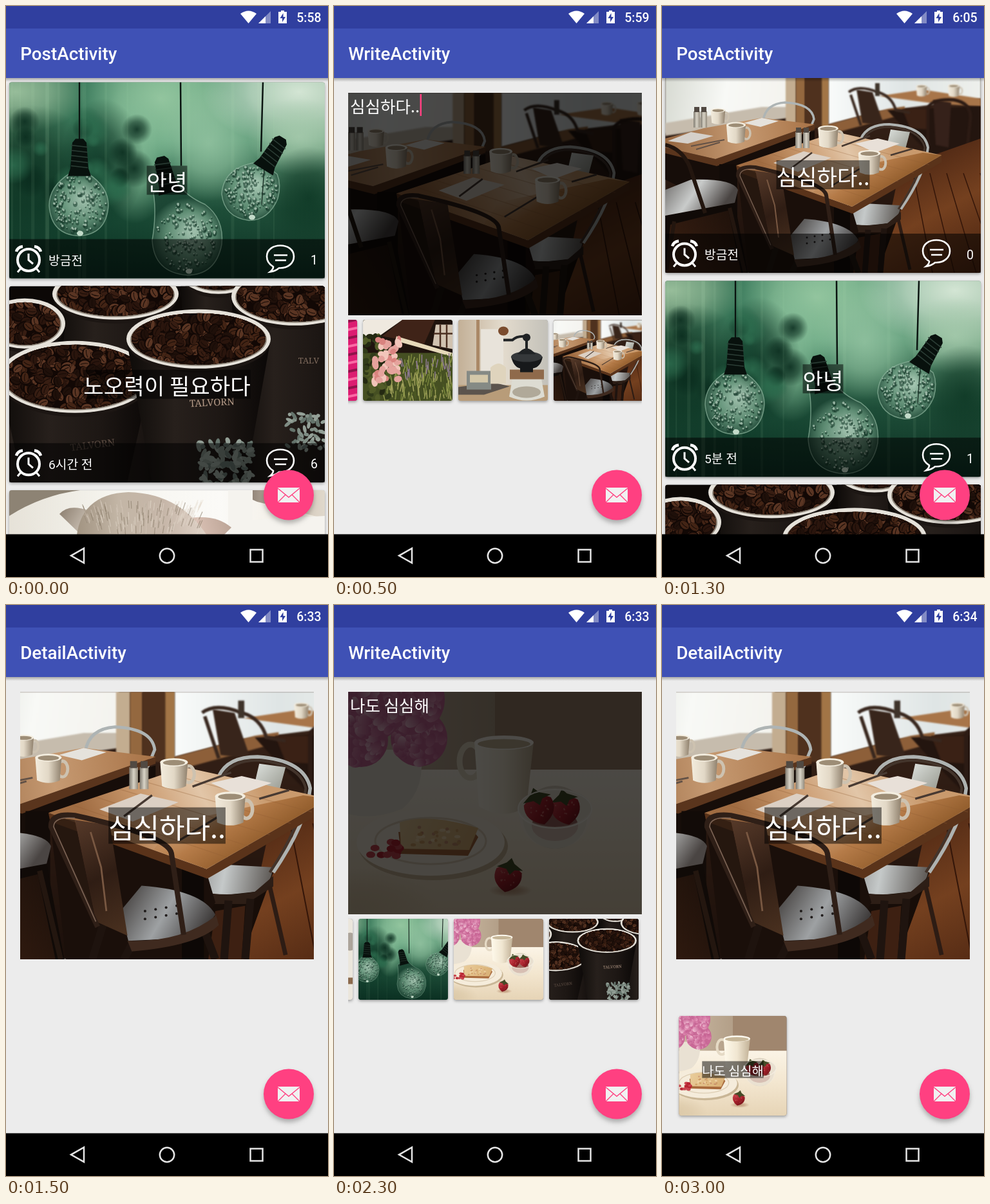
Write an HTML page with a canvas that moves like this. It is 500 by 888 pixels and loops after 3.5 s.

```html
<!DOCTYPE html>
<html lang="ko">
<head>
<meta charset="utf-8">
<style>
html, body { margin: 0; width: 100%; height: 100%; overflow: hidden; background: #ececec; }
canvas { display: block; width: 500px; height: 888px; }
</style>
</head>
<body>
<canvas id="stage" width="500" height="888"></canvas>
<script>
const ctx = document.getElementById('stage').getContext('2d');
const LATIN = 'Roboto, "Noto Sans CJK KR", "Noto Sans CJK", sans-serif';
const HANGUL = '"Noto Sans CJK KR", "Noto Sans CJK", sans-serif';

let seed = 1;
const rand = (lo = 0, hi = 1) => {
  seed = (seed * 16807) % 2147483647;
  return lo + (hi - lo) * seed / 2147483647;
};
const pick = list => list[Math.floor(rand(0, list.length))];

function rect(color, x, y, w, h) {
  ctx.fillStyle = color;
  ctx.fillRect(x, y, w, h);
}
function fill(color, d) {
  ctx.fillStyle = color;
  ctx.fill(new Path2D(d));
}
function stroke(color, width, d) {
  ctx.strokeStyle = color;
  ctx.lineWidth = width;
  ctx.stroke(new Path2D(d));
}
function ovalPath(x, y, rx, ry = rx, turn = 0) {
  ctx.beginPath();
  ctx.ellipse(x, y, rx, ry, turn, 0, 7);
}
function oval(color, ...shape) {
  ovalPath(...shape);
  ctx.fillStyle = color;
  ctx.fill();
}
function ring(color, width, ...shape) {
  ovalPath(...shape);
  ctx.strokeStyle = color;
  ctx.lineWidth = width;
  ctx.stroke();
}
function linear(x0, y0, x1, y1, ...colors) {
  const g = ctx.createLinearGradient(x0, y0, x1, y1);
  colors.forEach((c, i) => g.addColorStop(i / (colors.length - 1), c));
  return g;
}
function glow(color, x, y, rx, ry = rx) {
  ctx.save();
  ctx.translate(x, y);
  ctx.scale(1, ry / rx);
  const g = ctx.createRadialGradient(0, 0, 0, 0, 0, rx);
  g.addColorStop(0, color + 'e0');
  g.addColorStop(0.5, color + '90');
  g.addColorStop(1, color + '00');
  rect(g, -rx, -rx, 2 * rx, 2 * rx);
  ctx.restore();
}
function blurred(radius, draw) {
  ctx.filter = `blur(${radius}px)`;
  draw();
  ctx.filter = 'none';
}
function text(str, x, y, size, { font = LATIN, weight = 400, align = 'left', color = '#fff' } = {}) {
  ctx.font = `${weight} ${size}px ${font}`;
  ctx.textAlign = align;
  ctx.fillStyle = color;
  ctx.fillText(str, x, y);
}
function at(x, y, draw, turn = 0, scale = 1) {
  ctx.save();
  ctx.translate(x, y);
  ctx.rotate(turn);
  ctx.scale(scale, scale);
  draw();
  ctx.restore();
}

// ---- pictures ----

function mug(x, y, scale) {
  at(x, y, () => {
    ring('#cdc2b0', 3.5, 16, 0, 6, 9);
    fill(linear(-15, 0, 15, 0, '#f3ecdd', '#e2d8c6', '#8f806c'), 'M-15 -13L-13 13Q0 19 13 13L15 -13Z');
    oval('#f4eee0', 0, -13, 15, 4.5);
    oval('#9d8d76', 0, -12.5, 12, 3);
  }, 0, scale);
}
function shaker(x, y) {
  rect(linear(x, 0, x + 10, 0, '#7f7a70', '#d8d3c6', '#928a7c'), x, y, 10, 25);
  rect('#514942', x + 1, y - 7, 8, 8);
}
function cafeRoom() {
  rect(linear(0, 0, 0, 305, '#3a251a', '#2a1911', '#1c100b'), 0, 0, 490, 305);
  fill(linear(0, 0, 190, 30, '#d7dad2', '#f8f9f6', '#f4f3ee'), 'M0 0H190V62L0 88Z');
  fill('#c6bcad', 'M0 72L150 47H190V64L0 92Z');
  rect('#c3ad90', 187, 0, 16, 72);
  rect('#94683f', 203, 0, 14, 76);
  rect('#4f311e', 217, 0, 26, 80);
  rect('#a27546', 243, 0, 11, 78);
  fill(linear(254, 0, 490, 0, '#f9fbfa', '#dfe5e5', '#eef0ec'), 'M254 0H490V34L330 54L254 74Z');
  fill('#8d5f39', 'M254 74L345 50L372 46V58L254 90Z');
  fill('#a87549', 'M332 30L400 20L490 34V46L420 42Z');
  fill('#23150f', 'M345 52L490 46V150L420 130L365 74Z');
  fill('#3a2115', 'M368 50H408V82L380 80Z');
  // distant chairs
  fill('#38251b', 'M297 20L322 24L340 76L306 72Z');
  stroke('#38271e', 4, 'M285 24Q300 12 330 24Q352 30 358 52L380 56M288 28L304 76');
  fill('#35211a', 'M416 36L444 40L440 110L420 106Z');
  stroke('#2c1b14', 5, 'M408 108L408 50Q412 34 448 36Q474 40 474 64L466 140');
  mug(398, 22, 0.55);
  mug(448, 22, 0.6);
  rect('#3e332a', 326, 10, 7, 20);
}
function drawCafe() {
  blurred(1, cafeRoom);
  fill(linear(370, 120, 470, 305, '#4a2513', '#74401f', '#4c2511'), 'M365 140L490 96V305H330Z');
  for (let i = 0; i < 5; i++) stroke('#341609', 1.5, `M${385 + i * 26} 150L${415 + i * 34} 305`);
  // left table
  stroke('#aeb4b4', 3.5, 'M152 68Q156 42 186 40Q228 42 231 66L222 88');
  fill('#160d09', 'M0 112L78 128L232 84V100L112 140L60 190L0 160Z');
  fill('#5a351d', 'M0 110L78 128L232 74V82L80 139L0 119Z');
  fill(linear(0, 100, 230, 75, '#94653f', '#c69a72', '#a87347'), 'M0 96L60 80L150 64L232 74L78 128L0 110Z');
  fill('#d5d0ca', 'M4 100L40 86L75 92L35 104Z');
  fill('#e5e2dc', 'M122 72L150 64L176 69L148 78Z');
  stroke('#625146', 2, 'M40 108L92 98M48 113L85 102');
  mug(82, 62, 0.75);
  shaker(44, 54);
  shaker(55, 54);
  mug(110, 88, 1);
  rect('#120b08', 84, 136, 28, 130);
  // left chair
  fill('#100a07', 'M0 216L108 196L128 305H0Z');
  fill(linear(0, 305, 130, 220, '#3b2012', '#1c100a'), 'M8 230L98 208L118 305H0Z');
  fill(linear(0, 160, 80, 215, '#6f6d6b', '#c9cbca', '#4a4543'), 'M0 176L40 160Q105 158 113 176L108 196L0 216Z');
  stroke('#23160f', 6, 'M0 106Q26 112 38 140L62 212M14 225L2 300M100 204L124 305');
  // right chair
  fill('#170d08', 'M262 218L366 206L350 250L330 305H255Z');
  fill('#3d2012', 'M300 250L334 244L330 305H292Z');
  fill(linear(255, 200, 365, 220, '#6d6a68', '#c5c9c9', '#595450'), 'M252 212L290 196L364 200Q368 216 345 228L290 234Q256 230 252 212Z');
  fill('#2d1e16', 'M252 215Q290 238 345 228L366 210V222L335 242L275 242Z');
  stroke('#1f140f', 9, 'M315 238L310 305M340 236L334 305');
  stroke('#2d1c14', 5, 'M362 222L380 300');
  stroke('#aeb2b0', 4, 'M304 96Q314 74 348 74Q402 78 408 110Q404 150 366 206');
  stroke('#43342b', 3, 'M307 98Q318 78 348 78Q396 82 403 110Q399 150 362 206');
  fill(linear(345, 80, 380, 116, '#dfe3df', '#929389'), 'M350 82L380 86L372 116L344 108Z');
  // main table
  fill('#1a0f0a', 'M112 148L290 206L300 240L270 305H130Z');
  rect('#0d0806', 262, 200, 25, 105);
  fill('#5a331a', 'M110 138L290 202L429 122V133L291 213L112 148Z');
  fill(linear(170, 175, 340, 85, '#a06c42', '#c9986c', '#e2c6a8', '#c99a6d'), 'M110 138L265 86L429 122L290 202Z');
  fill(linear(310, 110, 350, 170, '#b87f4c00', '#b57b48', '#95602f'), 'M250 150L400 118L429 122L290 202L230 180Z');
  for (let i = 1; i < 6; i++) stroke('#8f5d3355', 1, `M${110 + i * 27} ${138 - i * 9}L${290 + i * 24} ${202 - i * 13}`);
  fill('#dcd0c4', 'M168 134L215 116L258 126L206 148Z');
  fill('#e8e0d8', 'M295 104L330 96L364 104L326 118Z');
  stroke('#483a32', 2.5, 'M196 142L228 118M258 170L304 142M274 108L318 92M350 122L384 112');
  shaker(202, 86);
  shaker(214, 86);
  mug(253, 94, 1.05);
  mug(317, 134, 1.15);
  // front chair
  stroke('#1e130e', 9, 'M172 266L160 305M208 282L196 305M286 268L300 305');
  fill(linear(195, 225, 290, 280, '#3f3b39', '#9ea1a3', '#34302f'), 'M192 250L216 221Q285 226 300 254Q288 276 240 282L201 284Z');
  fill('#3f2a1f', 'M200 284Q262 286 301 255L304 266Q280 290 205 296Z');
  for (let i = 0; i < 8; i++) oval('#1f1b1a', 220 + i % 4 * 12, 250 + (i >> 2) * 9 - i % 4 * 2, 1.5);
  fill(linear(140, 150, 205, 270, '#543828', '#2f1d14', '#49301f'), 'M140 146L180 152L200 278L164 262Z');
  stroke('#795842', 2, 'M158 160L170 200L176 250');
  fill('#2a1a12c0', 'M114 154Q114 142 140 146L164 262Z');
  stroke('#2f1f17', 6, 'M166 268L113 154Q112 138 140 141Q246 164 250 184L264 277');
  stroke('#7c6455', 1.2, 'M164 262L116 154Q116 142 140 144');
}

function beans(x, y, rx, ry) {
  ctx.save();
  ovalPath(x, y, rx, ry);
  ctx.clip();
  rect('#120805', x - rx, y - ry, 2 * rx, 2 * ry);
  const count = rx * ry / 14;
  for (let i = 0; i < count; i++) {
    at(x + rand(-rx, rx), y + rand(-ry, ry), () => {
      oval('#120805', 0, 1, 9, 6.5);
      oval(pick(['#432415', '#2a150d', '#5a3523', '#1f100a', '#371d12']), 0, 0, 8, 5.3);
      stroke('#170b06', 1, 'M-6 0Q0 2 6 0');
    }, rand(0, 3.1));
  }
  ctx.restore();
}
function leaf(x, y, count, scale) {
  for (let i = 0; i < count; i++) {
    oval(pick(['#7f8d84', '#65746c', '#94a097']), x + rand(-34, 34) * scale, y + rand(-30, 34) * scale,
      rand(3, 8) * scale, 3 * scale, rand(0, 3));
  }
}
function paperCup(x, y, rx, ry, taper) {
  fill(linear(x - rx, 0, x + rx, 0, '#0d0a08', '#27201c', '#1d1714', '#0a0706'),
    `M${x - rx} ${y}L${x - rx + taper} 320H${x + rx - taper}L${x + rx} ${y}Z`);
  oval('#1c1613', x, y + 6, rx - 2, ry);
  oval('#e6e2da', x, y, rx, ry);
  oval('#8c8377', x, y + 1, rx - 6, ry - 5);
  beans(x, y, rx - 8, ry - 6);
}
function drawCoffee() {
  rect('#0c0806', 0, 0, 490, 305);
  paperCup(325, -22, 60, 34, 20);
  paperCup(165, 12, 98, 40, 30);
  paperCup(444, 16, 99, 45, 20);
  paperCup(24, 58, 63, 39, 25);
  paperCup(102, 141, 118, 56, 40);
  paperCup(294, 82, 112, 46, 42);
  leaf(335, 275, 100, 1.2);
  leaf(462, 225, 55, 0.9);
  const brand = { font: '"Noto Serif", serif', align: 'center', color: '#b59b88' };
  at(315, 186, () => text('TALVORN', 0, 0, 15, brand), -0.05);
  at(465, 120, () => text('TALV', 0, 0, 13, { ...brand, color: '#806c5e' }));
  at(130, 252, () => text('TALVORN', 0, 0, 15, { ...brand, color: '#5e4e44' }), -0.12);
}

function screwBase(x, y, turn) {
  at(x, y, () => {
    fill('#08110d', 'M-6 -28H6L11 -22L14 18L18 30H-18L-14 18L-11 -22Z');
    for (let i = 0; i < 5; i++) stroke('#2c3e36', 1.5, `M-13 ${i * 8 - 18}L13 ${i * 8 - 15}`);
  }, turn);
}
function glass(x, y, rx, ry, outline) {
  const g = ctx.createRadialGradient(x + 8, y - 10, 5, x, y, rx * 1.2);
  g.addColorStop(0, '#b4d3bfd8');
  g.addColorStop(0.55, '#6c9a80d0');
  g.addColorStop(1, '#1c4433e0');
  fill(g, outline);
  stroke('#94bba3aa', 1.5, outline);
  for (let i = 0; i < 150; i++) {
    const a = rand(0, 6.28), r = Math.sqrt(rand(0, 0.9)), size = rand(1, 3.6);
    const px = x + rx * r * Math.cos(a), py = y + ry * r * Math.sin(a);
    oval('#12362788', px, py + 1, size, size * 1.2);
    oval('#c3ddcab0', px - 0.6, py - 1, size * 0.6);
  }
  oval('#c3dbc9', x + 2, y + ry - 2, 5, 4);
}
function drawBulbs() {
  rect(linear(0, 0, 490, 0, '#3d6c50', '#38785a', '#579a76', '#5f9b79', '#6c9d7c'), 0, 0, 490, 305);
  rect(linear(0, 90, 0, 305, '#0d372500', '#0e3a28cc', '#0b3022'), 0, 90, 490, 215);
  glow('#a3c8a4', 10, 15, 110, 65);
  glow('#9bcba4', 235, 25, 130, 95);
  glow('#86bd98', 195, 110, 60, 110);
  glow('#92c2a0', 310, 95, 80, 90);
  glow('#e2efe0', 450, 15, 150, 85);
  glow('#a5caac', 450, 85, 80, 60);
  glow('#0b3020', 30, 140, 110, 105);
  glow('#0e3625', 145, 125, 65, 100);
  glow('#0e3825', 465, 180, 70, 80);
  for (let i = 0; i < 25; i++) glow(pick(['#0a2c1e', '#2c6b4d']), rand(0, 200), rand(60, 200), rand(10, 30));
  for (let i = 0; i < 14; i++) rect('#b6dabb12', rand(0, 490), 0, rand(2, 7), 305);
  stroke('#0a1410', 2.5, 'M109 0V90M266 0L267 130M394 0L391 108');
  glass(108, 190, 45, 47, 'M94 142H122Q154 162 154 192Q151 237 108 239Q65 237 62 192Q62 162 94 142Z');
  screwBase(109, 116, 0);
  glass(277, 240, 50, 56, 'M224 172L262 158Q276 178 304 190Q334 212 330 252Q321 300 276 300Q225 296 222 246Q229 205 224 172Z');
  screwBase(242, 143, -0.25);
  glass(375, 169, 43, 43, 'M390 124L416 143Q423 160 417 181Q403 215 372 215Q334 210 330 174Q333 130 390 124Z');
  stroke('#1b3328', 1.5, 'M396 135L392 190');
  screwBase(410, 110, 0.55);
}

function strawberry(x, y, size, turn) {
  at(x, y, () => {
    fill(linear(-15, -15, 18, 20, '#c8414a', '#a51f2a', '#6e1419'), 'M-20 -10Q0 -26 20 -10Q26 12 0 24Q-26 12 -20 -10Z');
    for (let i = 0; i < 12; i++) oval('#d8888088', rand(-14, 14), rand(-8, 12), 1.2);
    fill('#454c27', 'M-20 -13L-6 -22L0 -30L6 -22L21 -14L8 -12L2 -4L-5 -12Z');
  }, turn, size);
}
function peony(x, y, radius) {
  oval('#c96a97', x, y, radius);
  for (let i = 0; i < 70; i++) {
    const a = rand(0, 6.28), r = Math.sqrt(rand()) * radius * 0.9;
    at(x + r * Math.cos(a), y + r * Math.sin(a), () => {
      const size = radius * rand(0.12, 0.26);
      oval(linear(-size, 0, size, 0, '#c45f91', pick(['#e79cbd', '#f2bfd4', '#dd87ae'])), 0, 0, size, size * 0.65);
    }, a + 1.6 + rand(-0.5, 0.5));
  }
}
function drawBreakfast() {
  rect('#a0866e', 0, 0, 456, 346);
  rect(linear(0, 0, 228, 0, '#d0c0aa', '#b39f88'), 0, 0, 228, 130);
  rect(linear(0, 120, 0, 346, '#fbf4e6', '#f3e6cf', '#e6d4b6'), 0, 121, 456, 225);
  glow('#d9c6a5', 20, 335, 120, 60);
  fill('#e9e1d3', 'M0 90H112Q122 150 84 182Q40 200 0 190Z');
  peony(20, 75, 42);
  peony(110, 72, 44);
  peony(95, 12, 55);
  peony(35, 25, 52);
  ring('#e5dac5', 9, 190, 108, 17, 26);
  fill(linear(196, 0, 290, 0, '#fffaec', '#f0e6d1', '#bfae93'), 'M196 78L203 178Q242 202 277 178L288 78Z');
  oval('#fffaf0', 242, 79, 46, 11);
  oval('#c6b698', 242, 81, 41, 7.5);
  oval('#c9b696', 132, 240, 116, 53);
  oval('#f5ecdb', 128, 234, 115, 52);
  ring('#ddceb5', 3, 128, 232, 86, 36);
  fill('#a86a3c', 'M78 218L192 214L202 226L186 255L82 252Z');
  fill(linear(80, 200, 190, 250, '#e9cc9a', '#d9b075'), 'M80 203Q125 188 202 212L188 246L82 244Z');
  for (let i = 0; i < 26; i++) oval(pick(['#cf9f65', '#efd5a7', '#b6706088']), rand(92, 180), rand(210, 240), rand(2, 5), 2.5);
  for (let i = 0; i < 15; i++) oval(pick(['#b82431', '#c94650']), 56 + rand(-22, 24), 243 + rand(-11, 13), 7, 5);
  oval('#d9cfbc', 321, 195, 50, 49);
  oval('#e9e0d0', 321, 182, 57, 32);
  oval('#9f6a60', 321, 208, 36, 24);
  strawberry(338, 182, 1.05, -0.2);
  strawberry(297, 181, 1.1, -0.3);
  fill('#f3ebddaa', 'M264 184Q268 240 321 244Q374 240 378 184Q360 210 321 210Q282 210 264 184Z');
  ring('#f6f1e5', 2, 321, 182, 57, 30);
  glow('#b98f70', 252, 309, 34, 10);
  strawberry(248, 288, 1, 0.2);
}

function drawRoses() {
  rect('#454f22', 0, 0, 139, 127);
  rect('#20140e', 0, 0, 139, 52);
  fill('#efe9df', 'M0 0H62L25 26H0Z');
  fill('#3f2318', 'M62 0H112L95 38L30 26Z');
  fill('#d0c2b0', 'M113 8H139V46L108 40Z');
  stroke('#4c3022', 2.5, 'M110 22H139M120 8V44M130 8V44');
  fill('#e6d9ba', 'M52 26L139 52V58L50 33Z');
  for (let i = 0; i < 220; i++) {
    const x = rand(35, 139), y = rand(65, 132);
    stroke(pick(['#7a873d', '#92994e', '#4c5923', y < 95 ? '#8e7a93' : '#a3a35c']), 1.5, `M${x} ${y}l${rand(-4, 4)} -13`);
  }
  for (let i = 0; i < 60; i++) oval(pick(['#313b1a', '#525c28', '#242912']), rand(0, 40), rand(25, 127), 6, 4, rand(0, 3));
  for (let i = 0; i < 42; i++) oval(pick(['#e5a39d', '#d9837f', '#f2c5ba']), rand(18, 58), rand(30, 98), rand(3, 8), 5, rand(0, 3));
}
function drawGrinder() {
  rect(linear(0, 0, 139, 0, '#c3b097', '#e3dbcd', '#c3c1b9'), 0, 0, 139, 127);
  rect('#aa8866', 28, 0, 5, 90);
  rect('#e8e3da', 35, 15, 35, 70);
  rect('#b89c79', 0, 102, 139, 25);
  fill('#5c544d', 'M0 105L55 98L80 104L40 117L0 117Z');
  rect('#858a85', 13, 80, 38, 29);
  rect('#d4c8a9', 18, 86, 28, 12);
  fill('#dfd4bd', 'M50 75Q63 62 74 75V100H50Z');
  fill('#dddcd2', 'M84 92H129L134 120Q106 132 79 120Z');
  oval('#b0a999', 106, 113, 22, 9);
  rect('#8f6a4b', 80, 78, 53, 15);
  fill('#17191b', 'M82 58H131Q128 74 116 76V82H96V76Q86 74 82 58Z');
  oval('#35383a', 106, 58, 24, 8);
  fill('#202325', 'M92 54Q106 36 120 54Z');
  stroke('#202325', 4, 'M106 50V26M70 32H84Q92 24 110 27');
  oval('#202325', 106, 28, 6);
  oval('#7b4c2e', 70, 18, 8, 7);
}
function drawPink() {
  rect('#dc1c71', 0, 0, 139, 127);
  for (let i = -3; i < 12; i++) stroke(i % 2 ? '#fa6aa5' : '#8f124a', 4, `M0 ${i * 13 + 30}L139 ${i * 13}`);
}
function drawMilk() {
  rect('#ebe6dc', 0, 0, 139, 127);
  oval('#aca49a', 135, 36, 10, 14);
  rect('#8b6a4d', 120, 92, 19, 10);
}
function drawCat() {
  rect(linear(0, 0, 490, 0, '#e6e2d8', '#f6f5ef', '#fbfaf7', '#eee8dd'), 0, 0, 490, 305);
  fill('#8d8374', 'M0 0H110Q50 8 0 40Z');
  fill(linear(340, 0, 490, 0, '#5d5146', '#c8bbad', '#e0d8cb'), 'M345 0H490V44L385 18Z');
  fill('#f5f3ee', 'M340 0H378V46L490 40V90H340Z');
  fill(linear(80, 30, 130, 60, '#8f8273', '#d8cec2'), 'M78 37Q92 20 125 32L135 70H112Z');
  fill(linear(345, 40, 280, 60, '#b9a294', '#e0c6ba'), 'M275 44Q320 36 345 58L325 78H290Z');
  fill(linear(100, 0, 310, 0, '#9f917f', '#c3b6a6', '#c6b6a8', '#e2d5ca'), 'M104 80Q108 6 185 3Q270 5 313 80Z');
  for (let i = 0; i < 170; i++) {
    const x = rand(118, 296);
    stroke(pick(['#85786699', '#e5dbce88', '#d8cbbd88']), 1.2, `M${x} ${rand(26, 70)}l${(x - 200) / 18} -12`);
  }
}

const picture = (draw, w = 490, h = 305) => ({ draw, w, h });
const cafe = picture(drawCafe), coffee = picture(drawCoffee), bulbs = picture(drawBulbs), cat = picture(drawCat);
const breakfast = picture(drawBreakfast, 456, 346);
const [roses, grinder, pink, milk] = [drawRoses, drawGrinder, drawPink, drawMilk].map(d => picture(d, 139, 127));

// Centre-crops a picture into a box.
function cover(pic, x, y, w, h, radius = 0) {
  const k = Math.max(w / pic.w, h / pic.h);
  ctx.save();
  ctx.beginPath();
  ctx.roundRect(x, y, w, h, radius);
  if (radius) {
    ctx.save();
    ctx.shadowColor = '#0005';
    ctx.shadowBlur = 4;
    ctx.shadowOffsetY = 2;
    ctx.fillStyle = '#888';
    ctx.fill();
    ctx.restore();
  }
  ctx.clip();
  ctx.translate(x + (w - pic.w * k) / 2, y + (h - pic.h * k) / 2);
  ctx.scale(k, k);
  seed = 77;
  pic.draw();
  ctx.restore();
}

// ---- interface ----

function caption(str, cx, cy, size) {
  ctx.font = `400 ${size}px ${HANGUL}`;
  const w = ctx.measureText(str).width, h = size * 1.32;
  rect('#00000080', cx - w / 2, cy - h / 2, w, h);
  text(str, cx, cy + size * 0.47, size, { font: HANGUL, align: 'center' });
}
function clockIcon() {
  ring('#fff', 4, 0, 1, 17);
  stroke('#fff', 3, 'M0 -9V1L7 7M-12 14L-17 20M12 14L17 20');
  stroke('#fff', 4.5, 'M-19 -12Q-17 -19 -9 -20M19 -12Q17 -19 9 -20');
}
function bubbleIcon() {
  stroke('#fff', 2.6, 'M-11 14Q-21 8 -21 -2C-21 -13 -11 -19 0 -19S21 -13 21 -2S11 16 0 16H-2Q-8 21 -16 22Q-11 18 -11 14ZM-10 -4H11M-8 4H9');
}
function post(y, [pic, title, age, count, ageSize = 19.2]) {
  const bottom = y + 305;
  cover(pic, 5, y, 490, 305, 4);
  rect('#0000008c', 5, bottom - 61, 490, 61);
  if (title) caption(title, 250, y + 152.5, 34.2);
  at(35, bottom - 29.5, clockIcon);
  at(426, bottom - 32, bubbleIcon);
  text(age, 66, bottom - 22.5 + ageSize * 0.08, ageSize);
  text(count, 484, bottom - 21.5, 19.44, { align: 'right' });
}
function thumbs(x, ...pics) {
  ctx.save();
  ctx.beginPath();
  ctx.rect(22, 484, 456, 140);
  ctx.clip();
  pics.forEach((pic, i) => cover(pic, x + i * 148, 488, 139, 126, 4));
  ctx.restore();
}
function chrome(title, time) {
  rect(linear(0, 112, 0, 118, '#00000048', '#00000000'), 0, 112, 500, 6);
  rect('#3f51b5', 0, 35, 500, 77);
  rect('#303f9f', 0, 0, 500, 35);
  text(title, 22.2, 84, 27.78, { weight: 500 });
  text(time, 489.5, 25, 19.44, { weight: 500, align: 'right' });
  fill('#fff', 'M376.5 27L364 12Q376.5 3 389 12Z');
  fill('#ffffff66', 'M411 8V27H392Z');
  fill('#fff', 'M403 16V27H392Z');
  fill('#fff', 'M427 7H432V9H436V27H423V9H427Z');
  fill('#303f9f', 'M430.5 11L425.5 19H429V25L434 17H430.5Z');

  rect('#000', 0, 821.5, 500, 67);
  stroke('#e4e4e4', 2.5, 'M121 843.5V866L101 854.8ZM379.5 845.5H398.5V864.5H379.5Z');
  ring('#e4e4e4', 2.5, 250, 855, 11.2);

  ctx.save();
  ctx.shadowColor = '#0004';
  ctx.shadowBlur = 7;
  ctx.shadowOffsetY = 5;
  oval('#ff4081', 439, 760.5, 39);
  ctx.restore();
  rect('#f1f1f1', 422, 749, 34, 23);
  stroke('#ff4081', 1.4, 'M422 750L439 764L456 750M422 772L434 760M456 772L444 760');
}

function listScreen(time, top, ...posts) {
  posts.forEach((item, i) => post(top + i * 317.3, item));
  chrome('PostActivity', time);
}
function writeScreen(time, pic, draft, cursorX, thumbX, ...pics) {
  cover(pic, 22, 135, 456, 346);
  rect('#000000b3', 22, 135, 456, 346);
  text(draft, 25, 165.5, 25.5, { font: HANGUL });
  if (cursorX) rect('#ff4081', cursorX, 137, 2.5, 34);
  thumbs(thumbX, ...pics);
  chrome('WriteActivity', time);
}
function detailScreen(time, reply) {
  cover(cafe, 22, 135, 456, 416);
  caption('심심하다..', 250, 343, 42.9);
  if (reply) {
    cover(breakfast, 26.5, 639, 167, 155, 4);
    caption(reply, 110, 722.5, 19.8);
  }
  chrome('DetailActivity', time);
}

const bored = '심심하다..', hello = '안녕', effort = '노오력이 필요하다';
const screens = [
  () => listScreen('5:58', 118.5, [bulbs, hello, '방금전', 1], [coffee, effort, '6시간 전', 6], [cat, '', '', '']),
  () => writeScreen('5:59', cafe, bored, 133.5, -103, pink, roses, grinder, cafe),
  () => listScreen('6:05', 110, [cafe, bored, '방금전', 0], [bulbs, hello, '5분 전', 1], [coffee, effort, '', '']),
  () => detailScreen('6:33'),
  () => writeScreen('6:33', breakfast, '나도 심심해', 0, -110, milk, bulbs, breakfast, coffee),
  () => listScreen('6:33', 118, [cafe, bored, '33분 전', 1], [bulbs, hello, '38분 전', 1, 15.5], [coffee, effort, '', '']),
  () => detailScreen('6:34', '나도 심심해'),
];

const HOLD = 500;
let shown = -1;
const start = performance.now();
function tick() {
  const index = Math.floor((performance.now() - start) / HOLD) % screens.length;
  if (index !== shown) {
    shown = index;
    rect('#ececec', 0, 0, 500, 888);
    screens[index]();
  }
  requestAnimationFrame(tick);
}
tick();
</script>
</body>
</html>
```
